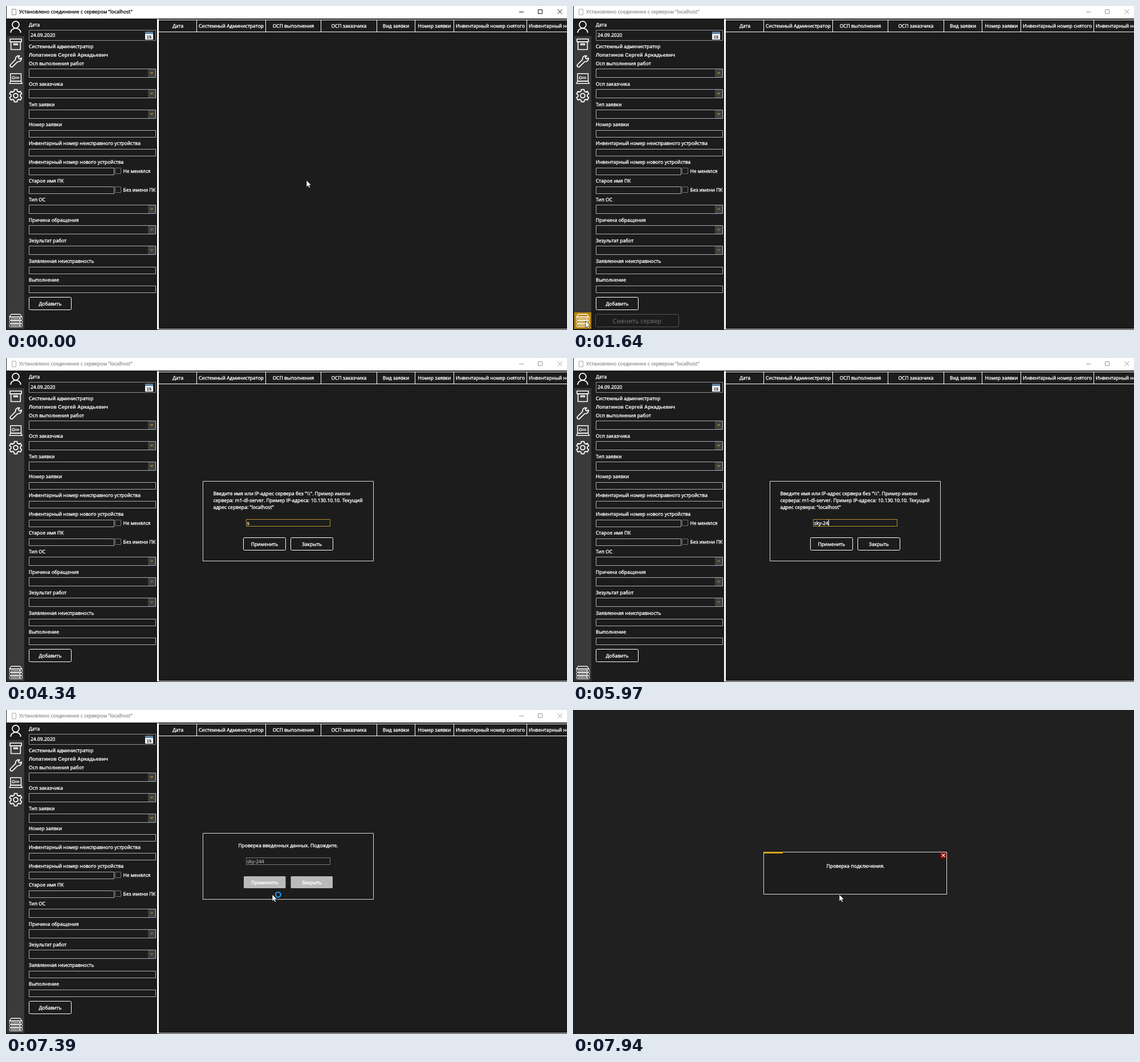
Recreate the animation shown at these times as an HTML page with a canvas. Size 984 px wide and 569 px high, loop 8 s.

```html
<!DOCTYPE html>
<html lang="ru">
<head>
<meta charset="utf-8">
<title>Установлено соединение</title>
<style>
html, body { margin: 0; width: 100%; height: 100%; overflow: hidden; background: #202020; }
canvas { display: block; }
</style>
</head>
<body>
<canvas id="stage" width="984" height="569"></canvas>
<script>
const ctx = document.getElementById('stage').getContext('2d');
const LOOP = 8000;
const DARK = '#1c1c1c', SIDE = '#3a3a3a', DESK = '#202020';
const WHITE = '#ffffff', EDGE = '#abadb3', RIM = '#dcdcdc', GOLD = '#b8912a';
const UI = '"Open Sans", "Noto Sans", sans-serif';
const ARIAL = '"Liberation Sans", Arial, sans-serif';

const clamp = v => Math.max(0, Math.min(1, v));
const ease = v => v * v * (3 - 2 * v);
const mix = (a, b, k) => a + (b - a) * k;

function fill(x, y, w, h, color) {
  ctx.fillStyle = color;
  ctx.fillRect(x, y, w, h);
}

function frame(x, y, w, h, color, r = 0) {
  ctx.strokeStyle = color;
  ctx.lineWidth = 1;
  ctx.beginPath();
  ctx.roundRect(x + 0.5, y + 0.5, w - 1, h - 1, r);
  ctx.stroke();
}

// y is the middle of the capital letters; a hairline stroke firms up small type
function text(str, x, y, color = WHITE, align = 'left', size = 8.5, face = UI, weight = 400) {
  ctx.font = `${weight} ${size}px ${face}`;
  ctx.textAlign = align;
  ctx.fillStyle = ctx.strokeStyle = color;
  ctx.fillText(str, x, y + size * 0.36);
  if (weight > 400) return;
  ctx.lineWidth = 0.35;
  ctx.lineJoin = 'round';
  ctx.strokeText(str, x, y + size * 0.36);
}

function line(points, color, width = 1, close = false) {
  ctx.strokeStyle = color;
  ctx.lineWidth = width;
  ctx.lineJoin = 'round';
  ctx.beginPath();
  points.forEach(([x, y], i) => i ? ctx.lineTo(x, y) : ctx.moveTo(x, y));
  if (close) ctx.closePath();
  ctx.stroke();
}

function arc(x, y, r, from = 0, to = Math.PI * 2, color = WHITE, width = 1.8) {
  ctx.strokeStyle = color;
  ctx.lineWidth = width;
  ctx.beginPath();
  ctx.arc(x, y, r, from, to);
  ctx.stroke();
}

function titleBar(active) {
  fill(1, 0, 983, 22, WHITE);
  frame(10, 5, 8, 11, active ? '#8a8a8a' : '#aaaaaa');
  const c = active ? '#111111' : '#999999';
  text('Установлено соединение с сервером "localhost"', 23, 10, c);
  line([[900, 10.5], [908, 10.5]], c);
  frame(933, 6, 8, 8, c);
  line([[967.5, 6], [975.5, 14]], c);
  line([[975.5, 6], [967.5, 14]], c);
}

function wrench(x, y) {
  ctx.save();
  ctx.translate(x, y);
  ctx.rotate(-Math.PI / 4);
  ctx.strokeStyle = WHITE;
  ctx.lineWidth = 1.7;
  ctx.lineJoin = 'round';
  ctx.beginPath();
  ctx.moveTo(12, -2);
  ctx.arc(7, 0, 5.2, -0.5, -2.6, true);
  ctx.lineTo(-10, -2.6);
  ctx.arc(-10, 0, 2.6, -Math.PI / 2, Math.PI / 2, true);
  ctx.lineTo(2.5, 2.6);
  ctx.arc(7, 0, 5.2, 2.6, 0.5, true);
  ctx.lineTo(8, 2);
  ctx.lineTo(8, -2);
  ctx.closePath();
  ctx.stroke();
  ctx.restore();
}

function gear(x, y) {
  const points = [];
  for (let i = 0; i < 6; i++) {
    const mid = i * Math.PI / 3;
    for (const [da, r] of [[-0.34, 8.4], [-0.22, 11.2], [0.22, 11.2], [0.34, 8.4]])
      points.push([x + Math.sin(mid + da) * r, y - Math.cos(mid + da) * r]);
  }
  line(points, WHITE, 1.8, true);
  arc(x, y, 3.9);
}

function serverIcon() {
  line([[9, 541.5], [25, 541.5], [28, 546], [6, 546]], WHITE, 1.3, true);
  for (let i = 0; i < 3; i++) {
    const y = 546 + i * 6;
    frame(6, y, 23, 6, WHITE, 1);
    for (let x = 9; x < 20; x += 2.5) fill(x, y + 2, 1.4, 2, WHITE);
    fill(22, y + 2, 4, 2, WHITE);
  }
}

function sidebar(hot) {
  fill(2, 53, 30, 514, SIDE);
  arc(17, 32.8, 6);
  ctx.beginPath();
  ctx.moveTo(8.2, 47);
  ctx.bezierCurveTo(8.5, 36.5, 25.5, 36.5, 25.8, 47);
  ctx.stroke();

  ctx.lineWidth = 1.6;
  ctx.strokeRect(7, 58, 20, 5);
  ctx.strokeRect(8.7, 63, 16.6, 13.5);
  ctx.strokeRect(13.5, 66.2, 7, 2);

  wrench(17, 97.5);

  ctx.lineWidth = 1.5;
  ctx.strokeRect(8, 118.7, 18.5, 13.3);
  line([[8, 132], [6, 136], [28.5, 136], [26.5, 132]], WHITE, 1.3, true);
  arc(13, 126, 2.1, 0.4, 5.9, WHITE, 1.2);
  line([[15, 125], [22.5, 125], [22.5, 127.2], [15, 127.2]], WHITE, 1);

  gear(17, 157.5);
  if (hot) fill(2, 538, 30, 29, '#b8860b');
  serverIcon();
}

function combo(y, mark) {
  frame(40, y, 223, 16, EDGE);
  fill(249, y + 1, 13, 14, '#404040');
  line([[253.2, y + 6.3], [255.5, y + 8.7], [257.8, y + 6.3]], mark, 1.2);
}

function field(y, w = 223) {
  frame(40, y, w, 13, EDGE);
}

function check(y, label) {
  frame(191, y, 11, 11, '#707070');
  text(label, 205.5, y + 5.5);
}

function button(x, y, w, h, label) {
  frame(x, y, w, h, WHITE, 2);
  text(label, x + w / 2, y + h / 2, WHITE, 'center');
}

function form() {
  text('Дата', 40, 33);
  frame(40, 42, 223, 19, '#8b9299');
  text('24.09.2020', 43, 51);
  fill(244, 45, 14, 14, '#eef1f5');
  fill(244, 45, 14, 4, '#5f7f9f');
  text('15', 251, 54.3, '#222222', 'center', 7.5, ARIAL, 700);

  text('Системный администратор', 40, 71);
  text('Лопатинов Сергей Аркадьевич', 40, 85.5, WHITE, 'left', 9, ARIAL, 700);

  const amber = '#d09a34', olive = '#918c3c';
  [
    ['Осп выполнения работ', 101, amber],
    ['Осп заказчика', 137, amber],
    ['Тип заявки', 173, amber],
    ['Тип ОС', 340, olive],
    ['Причина обращения', 376, olive],
    ['Зезультат работ', 412, olive]
  ].forEach(([label, y, mark]) => {
    text(label, 40, y);
    combo(y + 9, mark);
  });

  [
    ['Номер заявки', 208],
    ['Инвентарный номер неисправного устройства', 241],
    ['Инвентарный номер нового устройства', 274, 150],
    ['Старое имя ПК', 307, 150],
    ['Заявленная неисправность', 448],
    ['Выполнение', 481]
  ].forEach(([label, y, w]) => {
    text(label, 40, y);
    field(y + 10, w);
  });

  check(284, 'Не менялся');
  check(317, 'Без имени ПК');
  button(40, 511, 75, 23, 'Добавить');
}

function table() {
  fill(265, 23, 3, 545, WHITE);
  fill(265, 567, 719, 1, WHITE);
  fill(268, 24, 716, 1, WHITE);
  fill(268, 45, 716, 1, WHITE);
  const heads = ['Дата', 'Системный Администратор', 'ОСП выполнения', 'ОСП заказчика',
    'Вид заявки', 'Номер заявки', 'Инвентарный номер снятого'];
  const edges = [268, 334, 455, 552, 650, 717, 785, 913];
  heads.forEach((head, i) => {
    fill(edges[i + 1], 24, 1, 22, WHITE);
    text(head, (edges[i] + edges[i + 1]) / 2 + 0.5, 35, WHITE, 'center');
  });
  text('Инвентарный номер установленного', 917, 35);
}

function mainWindow(t) {
  fill(1, 0, 983, 569, DARK);
  titleBar(t < 1640);
  const opening = t >= 1580 && t < 1670;
  sidebar(opening);
  form();
  table();
  if (opening) {
    frame(39, 541, 147, 23, '#555555', 3);
    text('Сменить сервер', 112.5, 553, '#5c5c5c', 'center', 10.8);
  }
}

const keys = [[3750, 's'], [4550, 'k'], [4890, 'y'], [5380, '-'], [5690, '2'], [5970, '4'], [6120, '4']];
const caretSpans = [[2730, 3350], [3810, 4340], [4550, 5360], [5380, 6710]];
const typed = t => keys.filter(k => t >= k[0]).map(k => k[1]).join('');

function askDialog(t) {
  fill(345, 216, 300, 141, DARK);
  frame(345, 216, 300, 141, RIM);
  [
    'Введите имя или IP-адрес сервера без "\\\\". Пример имени',
    'сервера: m1-dl-server. Пример IP-адреса: 10.130.10.10. Текущий',
    'адрес сервера: "localhost"'
  ].forEach((row, i) => text(row, 363.5, 238 + i * 12));
  frame(421, 283, 148, 13, t >= 2270 ? GOLD : EDGE);
  const value = typed(t);
  text(value, 422.8, 289.8);
  if (caretSpans.some(([a, b]) => t >= a && t < b))
    fill(Math.round(423 + ctx.measureText(value).width), 284, 1, 11, WHITE);
  button(416, 315, 75, 23, 'Применить');
  button(499, 315, 75, 23, 'Закрыть');
}

function checkDialog() {
  fill(345, 216, 300, 117, DARK);
  frame(345, 216, 300, 117, RIM);
  text('Проверка введенных данных. Подождите.', 495, 238, WHITE, 'center');
  frame(421, 259, 148, 13, '#77787a');
  text('sky-244', 422.8, 265.8, '#999999');
  for (const [x, label] of [[417, 'Применить'], [499.5, 'Закрыть']]) {
    ctx.fillStyle = '#bababa';
    ctx.beginPath();
    ctx.roundRect(x, 292, 73.5, 21, 1.5);
    ctx.fill();
    text(label, x + 36.8, 302.5, WHITE, 'center');
  }
}

function connectDialog(t) {
  ctx.globalAlpha = clamp((t - 7670) / 90);
  fill(334, 249, 322, 75, DARK);
  frame(334, 249, 322, 75, RIM);
  fill(335, 249, 33 * clamp((t - 7700) / 240), 3, '#d9a520');
  fill(644, 250, 11, 11, '#8b0000');
  line([[646.8, 252.5], [652.4, 258.1]], WHITE, 1.2);
  line([[652.4, 252.5], [646.8, 258.1]], WHITE, 1.2);
  text('Проверка подключения.', 495.5, 273.5, WHITE, 'center');
  ctx.globalAlpha = 1;
}

function arrow(x, y) {
  ctx.beginPath();
  [[0, 0], [0, 12], [2.8, 9.4], [4.6, 13.6], [6.5, 12.7], [4.8, 8.7], [8.4, 8.5]]
    .forEach(([dx, dy]) => ctx.lineTo(x + dx, y + dy));
  ctx.closePath();
  ctx.fillStyle = WHITE;
  ctx.fill();
  ctx.strokeStyle = '#000000';
  ctx.lineWidth = 0.6;
  ctx.stroke();
}

function beam(x, y) {
  const c = '#d4d4d4';
  fill(x - 0.5, y - 6, 1, 11, c);
  fill(x - 2.5, y + 4.5, 2, 1, c);
  fill(x + 0.5, y + 4.5, 2, 1, c);
}

const moves = [
  [220, 990, 527, 306, 22, 553],
  [1910, 2320, 22, 553, 466, 289],
  [6740, 7050, 466, 289, 467, 324]
];

function pointer(t) {
  if (t >= 3750 && t < 6740) return;
  let x = 527, y = 306;
  for (const [a, b, x0, y0, x1, y1] of moves) {
    if (t < a) break;
    const k = ease(clamp((t - a) / (b - a)));
    x = mix(x0, x1, k);
    y = mix(y0, y1, k);
  }
  const overField = t > 1910 && x > 420 && x < 569 && y > 282 && y < 296;
  if (overField) beam(x, y);
  else arrow(x, y);
  if (t >= 7200 && t < 7450) arc(477.3, 324.3, 4.4, 0, Math.PI * 2, '#1f8fe5', 2.4);
}

function draw(t) {
  fill(0, 0, 984, 569, DESK);
  if (t < 7450) {
    mainWindow(t);
    if (t >= 7200) checkDialog();
    else if (t >= 1670) askDialog(t);
  } else if (t >= 7700) {
    connectDialog(t);
  }
  pointer(t);
}

ctx.textRendering = 'geometricPrecision';
const start = performance.now();
function tick() {
  draw((performance.now() - start) % LOOP);
  requestAnimationFrame(tick);
}
tick();
</script>
</body>
</html>
```
